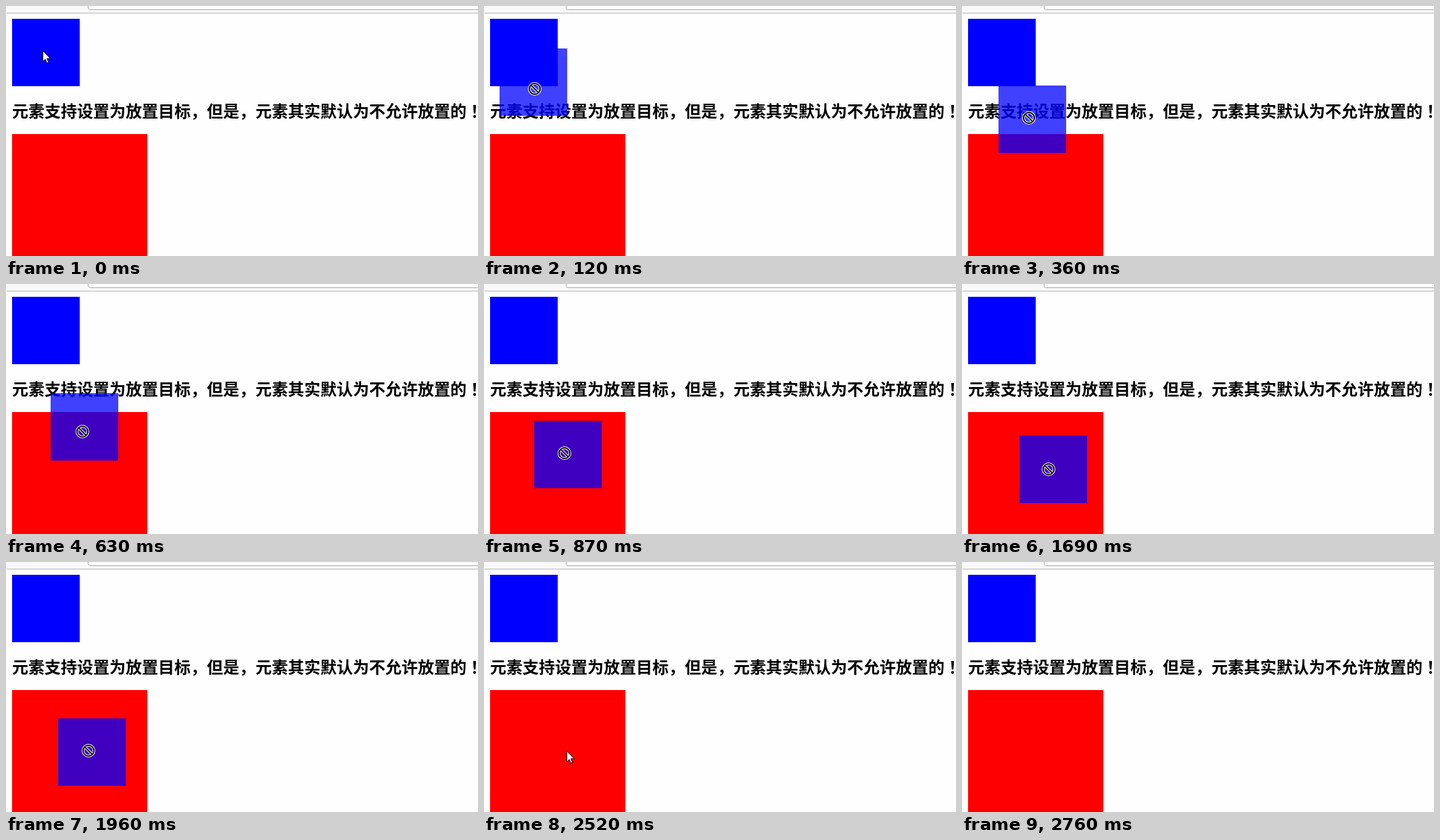
Write an HTML page that moves like this. It is 698 px wide and 371 px high and loops after 3.63 s.

```html
<!DOCTYPE html>
<html lang="zh-CN">
<head>
<meta charset="utf-8">
<title>拖放</title>
<style>
html, body { margin: 0; width: 100%; height: 100%; overflow: hidden; background: #fefefe; }
svg { display: block; }
text { font: bold 24px "Noto Sans CJK SC", "Noto Sans CJK", sans-serif; }
</style>
</head>
<body>
<svg width="698" height="371" viewBox="0 0 698 371">
  <path d="M0 0H698V10H0Z" fill="#f9f9f9"/>
  <path d="M121.5 -4V2.5Q121.5 5.5 124.5 5.5H700V-4Z" fill="#fff" stroke="#a9a9a9"/>
  <path d="M1 10.5H698" stroke="#b5b5b5"/>
  <rect x="9" y="19" width="100" height="100" fill="#00f"/>
  <text x="9" y="165">元素支持设置为放置目标，但是，元素其实默认为不允许放置的<tspan lang="ja" font-family="Noto Sans CJK JP">！</tspan></text>
  <rect x="9" y="190" width="200" height="200" fill="#f00"/>
  <rect id="ghost" width="100" height="100" fill="#00f" opacity=".75"/>
  <g id="banned" fill="none">
    <path id="sign" d="M-8 0A8 8 0 0 1 8 0A8 8 0 0 1 -8 0M-5.6 -5.6L5.6 5.6" stroke="#fff" stroke-width="4"/>
    <use href="#sign" style="display:none"/>
    <path d="M-8 0A8 8 0 0 1 8 0A8 8 0 0 1 -8 0M-5.6 -5.6L5.6 5.6" stroke="#000" stroke-width="2"/>
  </g>
  <path id="arrow" d="M.5 .5V16.5L4 13L6.5 18.5L9 17.5L6.5 12H11.5Z" fill="#fff" stroke="#000"/>
</svg>
<script>
const LOOP = 3630, GRAB = 120, RELEASE = 2520, LEAVE = 2760;
const HOLD = [45, 48];   // pointer's place within the dragged box
const LEAD = 0.22;       // how far the pointer runs ahead of the box
const [ghost, banned, arrow] = ['ghost', 'banned', 'arrow'].map(id => document.getElementById(id));

// Each stroke of the hand eases out in a few hard steps, then rests
const strokes = [
  { start: 0, end: GRAB, from: [9, 18], to: [9, 18] },
  { start: GRAB, end: 360, from: [23, 63], to: [54, 118] },
  { start: 630, end: 990, from: [66, 162], to: [74, 205] },
  { start: 1270, end: 1390, from: [72, 205], to: [89, 212] },
  { start: 1690, end: 1960, from: [85, 225], to: [77, 232] },
  { start: RELEASE, end: 2640, from: [77, 232], to: [366, 288] }
];

function boxAt(t) {
  const { start, end, from, to } = strokes.findLast(s => t >= s.start);
  const steps = Math.round((end - start) / 125);
  const p = Math.min(1, Math.floor((t - start) / (end - start) * steps) / steps);
  const left = (1 - p) ** 3;
  return {
    box: to.map((v, i) => Math.round(v + (from[i] - v) * left)),
    ahead: to.map((v, i) => Math.round((v - from[i]) * left * LEAD))
  };
}

function put(el, shown, [x, y]) {
  el.style.display = shown ? '' : 'none';
  el.setAttribute('transform', `translate(${x} ${y})`);
}

function draw(t) {
  const dragging = t >= GRAB && t < RELEASE;
  const { box, ahead } = boxAt(t);
  const hand = box.map((v, i) => v + HOLD[i]);
  put(ghost, dragging, box);
  put(banned, dragging, hand.map((v, i) => v + ahead[i]));
  put(arrow, !dragging && t < LEAVE, hand);
}

const begin = performance.now();
function tick() {
  draw((performance.now() - begin) % LOOP);
  requestAnimationFrame(tick);
}
tick();
</script>
</body>
</html>
```
